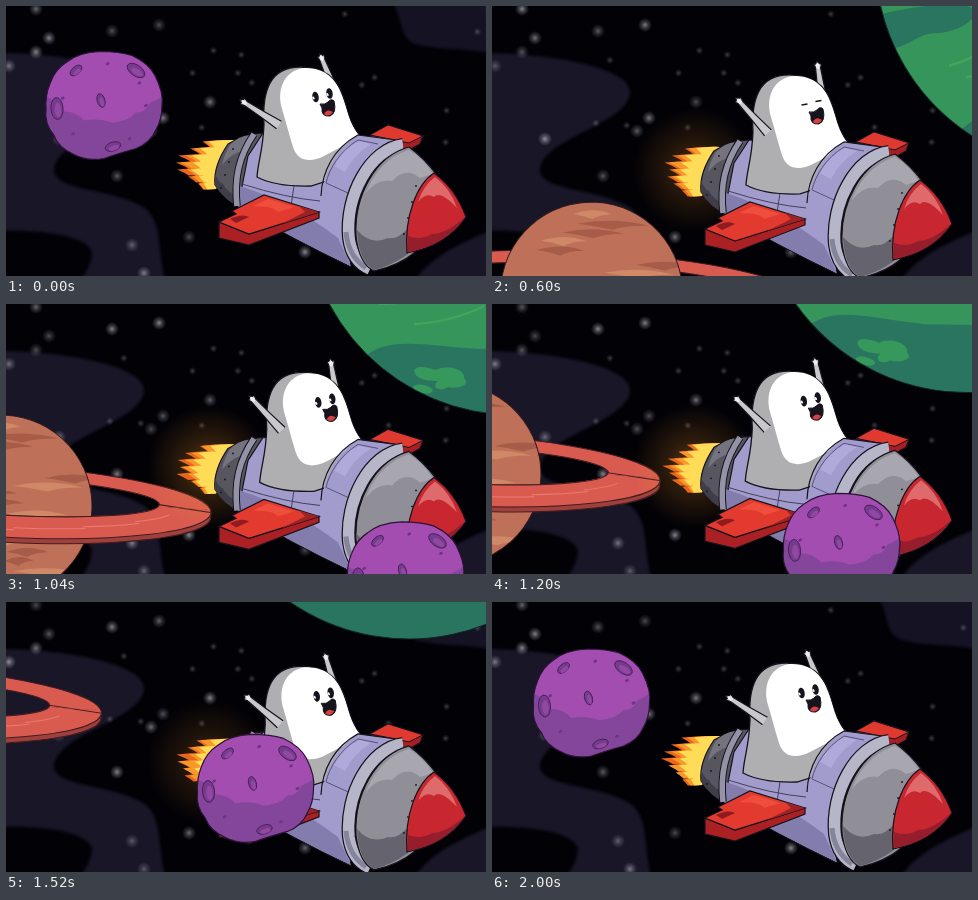
Animation of 480 by 270 pixels, one loop 2.04 s. Source, as an HTML page with a canvas:

```html
<!DOCTYPE html>
<html lang="en">
<head>
<meta charset="utf-8">
<title>Ghost on a rocket</title>
<style>
html, body { margin: 0; width: 100%; height: 100%; overflow: hidden; background: #020106; }
canvas { display: block; width: 480px; height: 270px; }
</style>
</head>
<body>
<canvas id="stage" width="480" height="270"></canvas>
<script>
const c = document.getElementById('stage').getContext('2d');
const LOOP = 2040, STEP = 40, INK = '#17131d';
const NAVY = '#191628', BLACK = '#020106';

function shape(d, fill, line, width = 1) {
  const p = new Path2D(d);
  if (fill) { c.fillStyle = fill; c.fill(p); }
  if (line) { c.strokeStyle = line; c.lineWidth = width; c.stroke(p); }
}

function oval(x, y, rx, ry, turn, fill, line) {
  c.beginPath();
  c.ellipse(x, y, rx, ry, turn, 0, 7);
  if (fill) { c.fillStyle = fill; c.fill(); }
  if (line) { c.strokeStyle = line; c.lineWidth = 1; c.stroke(); }
}

function glow(x, y, r, rgb, alpha) {
  const g = c.createRadialGradient(x, y, 0, x, y, r);
  g.addColorStop(0, `rgba(${rgb},${alpha})`);
  g.addColorStop(.45, `rgba(${rgb},${alpha * .45})`);
  g.addColorStop(1, `rgba(${rgb},0)`);
  c.fillStyle = g;
  c.fillRect(x - r, y - r, 2 * r, 2 * r);
}

// Draw in a moved and turned coordinate system
function at(x, y, turn, draw) {
  c.save();
  c.translate(x, y);
  c.rotate(turn);
  draw();
  c.restore();
}

const noise = n => { const s = Math.sin(n * 127.1) * 43758.5; return s - Math.floor(s); };

// Position after time u from start p with speed v and acceleration a
const glide = (u, p, v, a = 0) => p + v * u + a * u * u;

const brightStars = [[30, 3], [43, 32], [30, 46], [3, 60], [106, 25], [153, 19], [53, 133], [157, 112], [145, 125], [204, 96], [111, 170], [183, 231], [126, 239], [138, 267], [299, 246]];

function space(t) {
  c.fillStyle = BLACK;
  c.fillRect(0, 0, 480, 270);
  c.filter = 'blur(1.5px)';
  shape('M-9 47C55 47 138 61 138 86C138 118 48 132 48 165C50 186 110 182 140 203C158 220 150 245 161 280H-9Z', NAVY);
  shape('M-9 225C45 223 85 232 86 248Q85 262 70 280H-9Z', BLACK);
  shape('M384 -9C398 12 392 32 410 38C435 45 455 41 490 48V-9Z', '#151224');
  shape('M405 280C425 248 455 238 490 222V280Z', NAVY);
  c.filter = 'none';
  brightStars.forEach(([x, y], i) => glow(x, y, 7, '205,203,215', .5 + .15 * Math.sin(t / LOOP * 2 * Math.PI + i)));
  for (let i = 1; i <= 16; i++) glow(480 * noise(i), 150 * noise(i + 40), 4, '205,203,215', .3);
}

function greenPlanet(u) {
  const r = 209;
  at(glide(u, 508, -.205, -.00003), glide(u, -98, -.135, -.00004), u * .00035, () => {
    oval(0, 0, r, r, 0, '#2a7560');
    c.save();
    c.clip();
    shape('M-153 155C-130 128 -90 140 -34 143L40 140V0H-215V120Z', '#36955a');
    shape('M-212 23C-180 20 -150 20 -122 28C-105 38 -132 53 -158 50C-175 46 -190 62 -212 58Z', '#2a7560');
    shape('M-150 84Q-122 82 -98 64M-135 98Q-100 98 -78 82M-100 118Q-62 116 -30 100', null, '#41a55c', 2.5);
    shape('M-100 165C-98 158 -84 162 -78 164C-66 157 -48 164 -50 172C-42 180 -58 183 -66 181C-76 187 -83 180 -76 175C-86 175 -98 174 -100 165Z', '#37985c');
    oval(-91, 183, 10, 4, .2, '#37985c');
    c.restore();
    oval(0, 0, r, r, 0, null, '#10251f');
  });
}

function ring() {
  const band = (dy, fill) => {
    c.beginPath();
    c.ellipse(0, dy, 210, 36, 0, 0, 7);
    c.ellipse(0, -10, 158, 19, 0, 0, 7);
    c.fillStyle = fill;
    c.fill('evenodd');
    c.strokeStyle = '#421b20';
    c.lineWidth = 1;
    c.stroke();
  };
  band(0, '#9f403d');
  band(-5, '#d95b50');
  c.strokeStyle = '#ec7a70';
  for (let i = 0; i < 4; i++) {
    c.beginPath();
    c.ellipse(0, -7, 176 + 6 * i, 24 + 2 * i, 0, .3 + i * .4, .7 + i * .4);
    c.stroke();
  }
}

function ringedPlanet(u) {
  const r = 91;
  at(glide(u, -5, -.233, .00001), glide(u, 202, -.198, -.00001), .055, () => {
    ring();
    oval(0, 0, r, r, 0, '#bf7059');
    c.save();
    c.clip();
    // Leaf-shaped cloud streaks
    for (let i = 0; i < 18; i++) {
      const y = -78 + i * 9.5, x = -85 + 130 * noise(i + 5), w = 28 + 45 * noise(i + 9);
      shape(`M${x} ${y}q${w / 2} -9 ${w} -2q${-w / 3} 1 ${-w / 2} 6q${-w / 4} -3 ${-w / 2} -4Z`, i % 3 ? '#a65c48' : '#cf8967');
    }
    c.restore();
    oval(0, 0, r, r, 0, null, '#30191b');
    c.save();
    c.beginPath();
    c.rect(-230, -8, 460, 70);
    c.clip();
    ring();
    c.restore();
  });
}

function asteroid(t) {
  const u = t - 2000;
  const [x, y] = t < 700 ? [glide(t, 98, -.282), glide(t, 99.5, -.161)] : [glide(u, 99.5, -.3125), glide(u, 101, -.178)];
  at(x, y, 0, () => {
    const rim = 'M-4 -54Q15 -54 28 -50Q45 -42 51 -30Q60 -12 58 0Q58 14 52 24Q47 37 32 43Q14 48 0 53Q-17 56 -30 49Q-46 42 -50 30Q-60 18 -58 4Q-59 -10 -54 -22Q-49 -36 -38 -43Q-26 -53 -4 -54Z';
    shape(rim, '#a34db1');
    c.save();
    c.clip(new Path2D(rim));
    shape('M-60 -10Q-44 -4 -40 6Q-28 6 -20 15Q-5 12 8 17Q24 16 32 7Q42 7 46 -3Q54 -5 62 -14V60H-60Z', '#84469a');
    c.restore();
    // x, y, half length, tilt
    for (const [cx, cy, size, turn] of [[32, -35, 10, .6], [-28, -35, 7, -.7], [-3, -5, 7, 1.3], [-47, 3, 11, 1.5], [9, 41, 8, -.3]]) {
      oval(cx, cy, size, size * .55, turn, '#763b8c', '#48205a');
      oval(cx + 1, cy + 1.5, size * .65, size * .3, turn, '#9148a2');
    }
    for (let i = 0; i < 6; i++) oval(42 * Math.cos(i * 2.4), 42 * Math.sin(i * 2.4), 2, 1.4, -.5, '#6d3483');
    shape(rim, null, '#2c1238', 1.2);
  });
}

// Tongues fan out to the left of the nozzle, longest near the middle
function flame(n, size, fill) {
  const count = 7;
  c.beginPath();
  c.moveTo(228, 134);
  for (let i = 0; i < count; i++) {
    const f = (i + .5) / count, x = 228 - 17 * f, y = 134 + 49 * f;
    const reach = size * (.85 + .2 * noise(n * 9 + i)) * (31 - 17 * f + 27 * Math.sin(Math.PI * f));
    c.quadraticCurveTo(x - reach / 2, y - 4, x - reach, y - 2);
    c.quadraticCurveTo(x - reach * .85, y + 1, x - reach * .75, y + 4);
  }
  c.lineTo(210, 183);
  c.closePath();
  c.fillStyle = fill;
  c.fill();
}

function fire(t) {
  const n = t / STEP;
  glow(203, 157, 62, '240,150,40', .4 * Math.max(0, Math.sin(Math.PI * t / 2000)));
  flame(n, 1, '#e9661b');
  flame(n + 3, .9, '#f8972a');
  flame(n + 5, .72, '#ffdc58');
}

// Tapered arm, open at the shoulder, with three fingers
function arm(x1, y1, x2, y2, width) {
  const angle = Math.atan2(y2 - y1, x2 - x1), len = Math.hypot(x2 - x1, y2 - y1), w = width / 2;
  at(x1, y1, angle, () => {
    const side = `M0 ${-w}Q${len / 2} -3 ${len} -2.5Q${len + 5} -5 ${len + 3} -1Q${len + 9} -1 ${len + 3} 1.5Q${len + 4} 5 ${len - 1} 2.5Q${len / 2} 3 0 ${w}`;
    shape(side, '#c9c9cc', INK, 1.2);
    oval(len + 1, 0, 3, 1.8, 0, '#eee');
  });
}

function ghost(t, k) {
  at(3 * k, k, 0, () => {
    arm(327, 80, 316 + 7 * k, 53, 8);
    shape('M251 171C252 155 257 145 258 118C256 85 264 61 294 61C318 61 331 72 337 90C342 104 342 116 355 131L330 172L305 180Q270 181 251 171Z', '#afafb2', INK, 1.3);
    shape('M297 62C276 66 271 86 276 103C281 120 283 128 287 141C292 157 306 156 318 150L354 131C342 116 342 104 336 90C330 72 318 61 297 62Z', '#fff');
    arm(273, 119, 239 + 6 * k, 97 - 9 * k, 9);
    for (const [x, y] of [[309.5, 91], [323.5, 87.5]]) {
      if (t >= 520 && t < 720) {
        shape(`M${x - 3} ${y}l6 -1`, null, INK, 1.6);
      } else {
        oval(x, y, 3.2, 5.4, -.15, INK);
        oval(x - 2, y + 1, 1, 1.6, -.6, '#fff');
      }
    }
    shape('M314 98Q319 99 322 96Q325 92 328 95Q331 107 324 110Q315 111 316 102Z', INK, INK);
    shape('M318 108Q321 102 327 106Q323 112 318 108Z', '#d94040');
  });
}

function rivets(x, y, dx, dy, count) {
  for (let i = 0; i < count; i++) oval(x + dx * i, y + dy * i, .9, .9, 0, INK);
}

function fin() {
  shape('M213 216L243 228L313 206V212L243 239L213 232Z', '#ab2023', INK, 1.2);
  shape('M213 216L230 208L226 205L258 189L313 206L243 228Z', '#e23a2e', INK, 1.2);
  shape('M293 200L313 206L275 218L299 206Z', '#9d2226');
  shape('M224 213Q236 207 243 211L230 217Z', '#8f1b20');
  shape('M262 193L288 201L272 206Q268 200 247 200Z', '#f04e3c');
}

function rocketBack() {
  shape('M362 131L382 119L417 130L414 138L403 144Z', '#a62023', INK, 1.2);
  shape('M364 129L382 119L417 130L403 137Z', '#e0392f', INK);
  shape('M257 127Q238 128 222 138Q207 160 209 179Q220 194 237 203Q236 165 257 127Z', '#57565f', INK, 1.2);
  shape('M244 129Q232 130 224 139Q218 149 216 159Q226 147 236 145Z', '#74737e');
  shape('M209 168Q213 177 217 178Q220 185 233 192L237 203Q217 194 209 179Z', '#3f3e48');
  rivets(227, 143, -4, 13, 4);
  shape('M257 127L242 150L232 201Q285 232 345 261L340 215Q345 160 388 134L350 129Z', '#a29ccd', INK, 1.2);
  shape('M234 180Q285 196 332 232L345 260Q285 232 232 200Z', '#827dad');
  const stripe = 'M248 128C233 150 228 172 231 200';
  shape(stripe, null, INK, 7.5);
  shape(stripe, null, '#9392a7', 5.5);
  shape('M236 178Q280 192 314 195M288 180L285 200', null, '#45405f');
}

function rocketFront() {
  shape('M314 215C313 178 325 145 352 129L390 134C363 144 344 170 339 226Z', '#a29ccd');
  shape('M315 190C316 165 328 142 352 129L390 134', null, INK, 1.2);
  shape('M320 177C323 163 334 145 352 134L372 138M320 177L342 187', null, '#59527d');
  shape('M328 160Q338 142 353 135L365 138Q348 148 339 166Z', '#b0aada');
  const collar = 'M397 139C364 143 339 190 343 232Q346 255 364 263';
  shape(collar, null, INK, 14);
  shape(collar, null, '#b7b6c8', 11.5);
  shape('M340 226Q342 250 360 262', null, '#85849a', 5);
  shape('M403 141C369 150 348 190 350 230Q353 258 368 265Q392 260 408 247L430 168Q418 152 403 141Z', '#908f98', INK, 1.2);
  shape('M403 144C385 149 368 165 360 187Q372 172 386 175Q400 160 414 172L427 168Q417 152 403 144Z', '#a8a7af');
  shape('M351 224Q365 240 382 232Q392 234 402 222L402 248Q385 260 368 264Q352 255 351 224Z', '#64636e');
  shape('M428 167C411 178 398 210 401 247Q440 240 460 211Q450 183 428 167Z', '#c8272f', INK, 1.2);
  shape('M429 171Q417 180 412 196Q420 186 428 191Q434 184 451 202Q444 182 429 171Z', '#de6a6c');
  shape('M402 230Q415 235 426 228Q440 228 459 211Q440 239 402 246Z', '#961d2c');
  rivets(410, 180, -4, 16, 4);
  fin();
}

function draw(t) {
  const turn = Math.PI * t / 2000;
  const bob = Math.max(0, .95 * (Math.sin(turn) + .25 * Math.sin(2 * turn)));
  const u = t - 1040;
  space(t);
  greenPlanet(u);
  ringedPlanet(u);
  at(0, 7 * bob, 0, () => {
    fire(t);
    rocketBack();
    ghost(t, bob);
    rocketFront();
  });
  asteroid(t);
}

const start = performance.now();
function tick() {
  const t = (performance.now() - start) % LOOP;
  draw(Math.floor(t / STEP) * STEP);
  requestAnimationFrame(tick);
}
tick();
</script>
</body>
</html>
```
